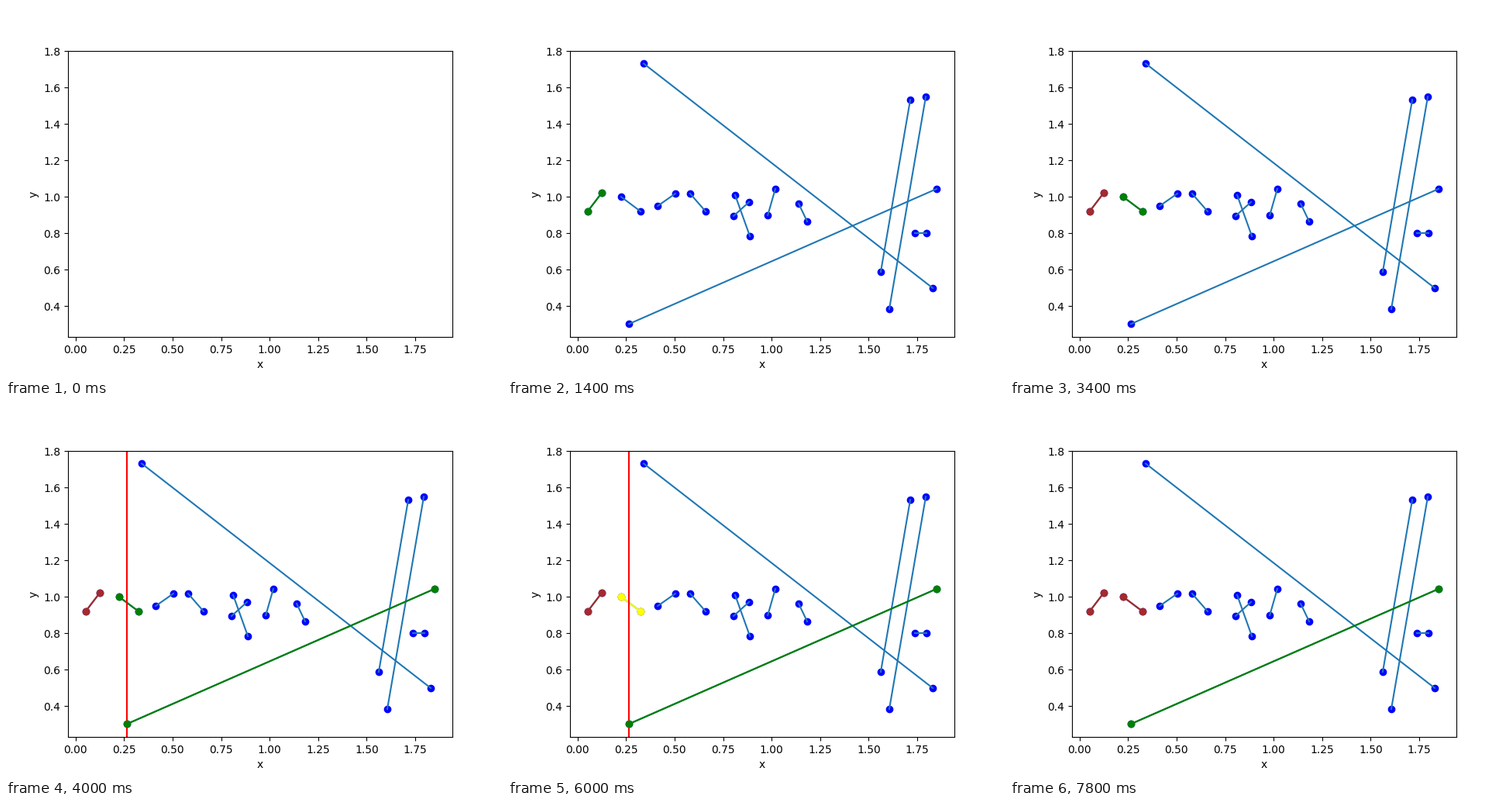
A matplotlib script that plays this animation: 640 by 480 pixels, repeating every 8000 ms.

```python
import matplotlib.pyplot as plt
from matplotlib.animation import FuncAnimation

FRAMES, STEP_MS = 40, 200

fig, ax = plt.subplots(figsize=(6.4, 4.8), dpi=100)
ax.set(xlim=(-0.0386, 1.9414), ylim=(0.23, 1.803), xlabel="x", ylabel="y")

changes = []  # (frame, artist, new colour or None to hide)
clock = 1


class Segment:
    """Blue segment whose highlight is laid on top and recoloured in place."""

    def __init__(self, x0, y0, x1, y1):
        self.ends = [(x0, y0), (x1, y1)]

    def draw_base(self):
        xs, ys = zip(*self.ends)
        dots = ax.scatter(xs, ys, color="blue")
        line, = ax.plot(xs, ys, color="C0")
        change(dots, "blue")
        changes.append((clock + 1, line, "C0"))

    def insert(self):
        self.dots = [ax.plot(*end, "o")[0] for end in self.ends]
        self.line, = ax.plot(*zip(*self.ends))
        for dot in self.dots:
            change(dot, "green")
        tick()
        change(self.line, "green")
        tick(2)

    def recolor(self, color, order=1):
        for part in self.dots[::order] + [self.line]:
            change(part, color)
            tick()

    def remove(self):
        self.recolor("brown", order=-1)


def change(artist, color):
    changes.append((clock, artist, color))


def tick(count=1):
    global clock
    clock += count


def compare(a, b):
    for color in ("yellow", "green"):
        a.recolor(color)
        b.recolor(color)


def sweep(end, *actions):
    """Show the sweep line at an end point while the actions run."""
    line = ax.axvline(end[0])
    change(line, "red")
    tick()
    for action, *args in actions:
        action(*args)
    change(line, None)
    tick()


first = Segment(0.052, 0.92, 0.125, 1.022)
second = Segment(0.225, 1.0, 0.325, 0.92)
rising = Segment(0.265, 0.302, 1.85, 1.044)
others = [
    Segment(0.341, 1.732, 1.83, 0.499),
    Segment(0.413, 0.95, 0.504, 1.018),
    Segment(0.58, 1.018, 0.66, 0.92),
    Segment(0.804, 0.895, 0.884, 0.972),
    Segment(0.812, 1.01, 0.888, 0.784),
    Segment(0.98, 0.899, 1.019, 1.044),
    Segment(1.139, 0.963, 1.183, 0.865),
    Segment(1.562, 0.588, 1.714, 1.533),
    Segment(1.606, 0.384, 1.794, 1.55),
    Segment(1.738, 0.801, 1.798, 0.801),
]

for seg in [first, second, rising, *others]:
    seg.draw_base()
tick(2)

sweep(first.ends[0], (first.insert,))
sweep(first.ends[1], (first.remove,))
sweep(second.ends[0], (second.insert,))
sweep(rising.ends[0], (rising.insert,), (compare, rising, second))
sweep(second.ends[1], (second.remove,))


def draw(frame):
    for _, artist, _ in changes:
        artist.set_visible(False)
    for start, artist, color in changes:
        if start <= frame:
            artist.set_visible(color is not None)
            if color:
                artist.set_color(color)


anim = FuncAnimation(fig, draw, frames=FRAMES, interval=STEP_MS,
                     init_func=lambda: draw(0), repeat=True, repeat_delay=0)
plt.show()
```
